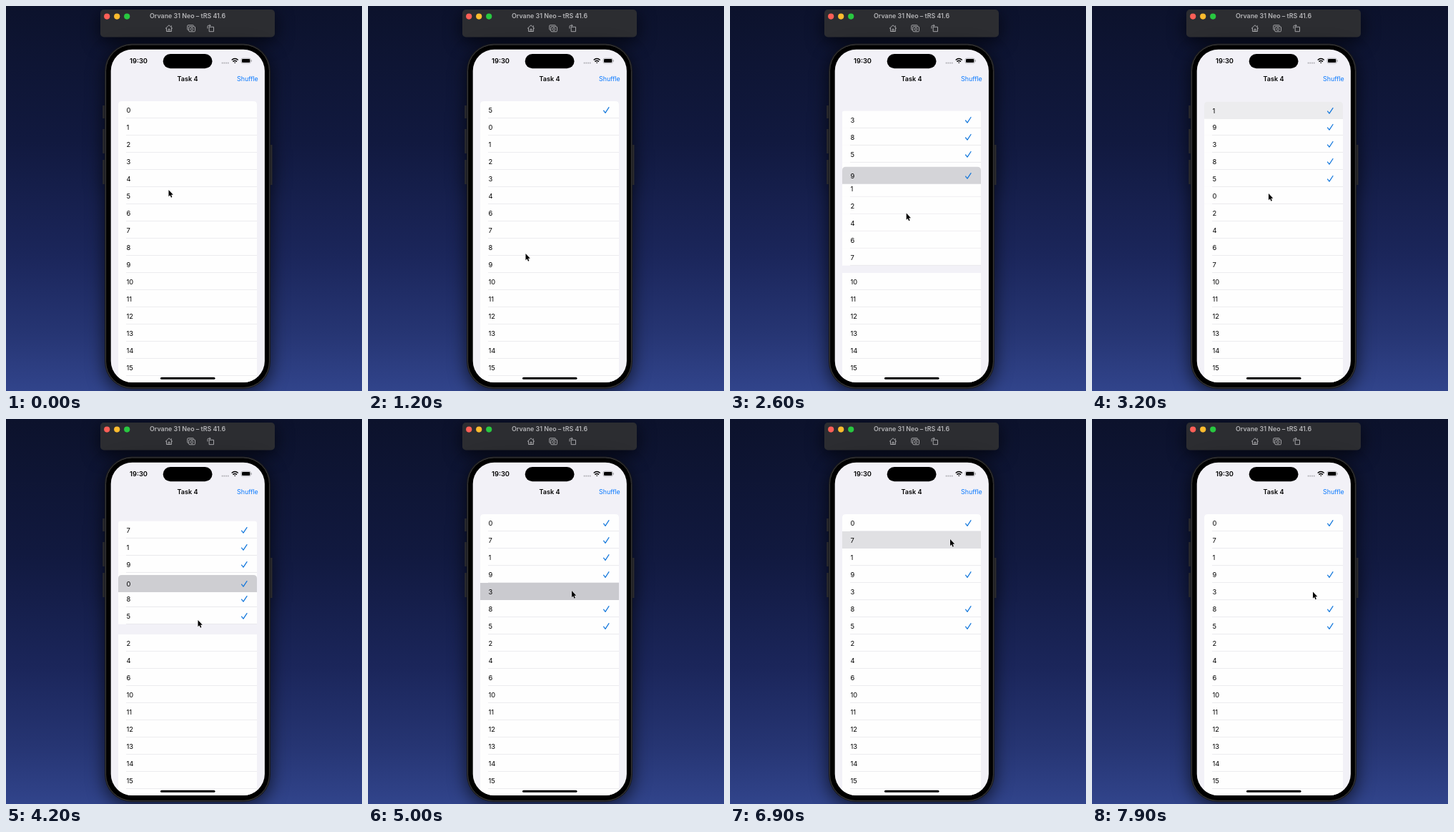
These frames come from a looping animation (498x538 px, 8000 ms). An HTML page:

```html
<!DOCTYPE html>
<html lang="en">
<head>
<meta charset="utf-8">
<title>Shuffle list</title>
<style>
  html, body { margin: 0; width: 100%; height: 100%; overflow: hidden; background: #0d1330; }
  svg { display: block; }
  text { font-family: Inter, sans-serif; font-size: 9.35px; }
  .semi { font-weight: 600; text-anchor: middle; }
  .icons { fill: none; stroke: #b4b4b7; stroke-width: .9; stroke-linejoin: round; }
  .check { fill: none; stroke: #1478dc; stroke-width: 1.25; stroke-linecap: round; stroke-linejoin: round; }
  .shadow { filter: drop-shadow(0 6px 12px #000a); }
</style>
</head>
<body>
<svg width="498" height="538" viewBox="0 0 498 538">
  <defs>
    <linearGradient id="sky" x2="0" y2="1">
      <stop offset="0" stop-color="#0c122c"/>
      <stop offset=".35" stop-color="#11193f"/>
      <stop offset=".65" stop-color="#1b265b"/>
      <stop offset=".85" stop-color="#263573"/>
      <stop offset="1" stop-color="#31448b"/>
    </linearGradient>
    <clipPath id="screen"><rect x="146.7" y="60.8" width="215.2" height="465.2" rx="30"/></clipPath>
  </defs>
  <rect width="498" height="538" fill="url(#sky)"/>

  <g class="shadow"><rect x="132" y="5" width="244" height="38.5" rx="5" fill="#2c2d31"/></g>
  <g id="lights"></g>
  <text class="semi" x="254" y="17.3" fill="#b4b4b7" style="font-size:8.9px">Orvane 31 Neo – tRS 41.6</text>
  <g class="icons">
    <path d="M223 31.5L228 26.8 233 31.5M224.5 30.5V35.5H231.5V30.5M227 35.5V32.3H229.2V35.5M231.3 29.5V27.3"/>
    <path d="M255.5 33.5H254.8Q253.8 33.5 253.8 32.5V27.8Q253.8 26.8 254.8 26.8H261.5Q262.5 26.8 262.5 27.6"/>
    <rect x="255.8" y="28.8" width="8.7" height="7" rx="1.2"/>
    <circle cx="260.1" cy="32.3" r="1.8"/>
    <path d="M284.2 29.3H290.5V35.7H284.2ZM282 31.5V28.6Q282 27.3 283.3 27.3H286M284.6 25.8L286.1 27.3 284.6 28.8"/>
  </g>

  <g class="shadow">
    <path d="M136.5 139V157M136.5 172V206M136.5 215V249M371.2 194V250" stroke="#29292c" stroke-width="2.6"/>
    <rect x="138" y="52.5" width="232" height="482.5" rx="38" fill="#1b1b1d"/>
  </g>
  <rect x="139.6" y="54.1" width="228.8" height="479.3" rx="36.5" fill="#000" stroke="#3c3c3e"/>

  <g clip-path="url(#screen)">
    <rect x="146" y="60" width="217" height="467" fill="#f2f1f7"/>
    <g id="list"></g>
    <rect x="216" y="518.7" width="76.5" height="3" rx="1.5"/>
  </g>

  <rect x="219.7" y="67" width="68.8" height="20.3" rx="10.1"/>
  <text class="semi" x="185.5" y="80.3">19:30</text>
  <path d="M301.8 79.6H311.5" stroke="#a9a9ae" stroke-width="1.6" stroke-dasharray="1.6 1.1"/>
  <path d="M315.7 75.6Q320.2 71.6 324.7 75.6M317.4 77.6Q320.2 75.2 323 77.6" fill="none" stroke="#000" stroke-width="1.4"/>
  <path d="M318.9 78.7L320.2 80.2 321.5 78.7Z"/>
  <rect x="329" y="73.1" width="13.3" height="7" rx="2.2" fill="none" stroke="#9b9ba0" stroke-width=".7"/>
  <rect x="330" y="74.1" width="11.3" height="5" rx="1.3"/>
  <path d="M343.4 75.5V77.7" stroke="#9b9ba0" stroke-width=".9"/>
  <text class="semi" x="254" y="105.4" style="font-size:9.1px">Task 4</text>
  <text x="323" y="105.4" fill="#0a7aff" style="font-size:8.9px">Shuffle</text>

  <path id="cursor" d="M0 0V9.2L2 7.3 3.5 10.7 4.9 10.1 3.5 6.7H6.3Z" stroke="#fff" stroke-width=".7" paint-order="stroke"/>
</svg>
<script>
const LOOP = 8000, STEP = 100;
const ROWS = 17, ROW_H = 24, TOP = 133;
const MOVE = 400, GLOW_HOLD = 150, GLOW_FADE = 350;
const TRAVEL = 200, REST = 150;   // the pointer travels, rests, then taps

// Where the pointer stops, and the number it taps there, if any
const stop = (time, x, y, tap) => ({ time, x, y, tap });
const stops = [
  stop(0, 228, 252), stop(250, 227, 262, 5), stop(1350, 220.5, 346, 8), stop(1920, 249, 276, 3),
  stop(2380, 246, 360, 9), stop(2820, 247, 262, 1), stop(3550, 258, 360, 7), stop(4024, 268.5, 281, 0),
  stop(4850, 285, 240, 3), stop(5520, 307, 202, 1), stop(6600, 308, 168, 7),
  stop(7300, 290, 344), stop(7750, 300, 290), stop(8050, 309, 241.5),
];

const $ = id => document.getElementById(id);
const clamp = v => Math.max(0, Math.min(1, v));
const ease = v => (v = clamp(v), v * v * (3 - 2 * v));
const mix = (a, b, k) => a + (b - a) * k;

function add(parent, tag, attrs = {}) {
  const el = document.createElementNS('http://www.w3.org/2000/svg', tag);
  for (const key in attrs) el.setAttribute(key, attrs[key]);
  return parent.appendChild(el);
}

['#fe5f57', '#febc2e', '#28c840'].forEach((fill, i) =>
  add($('lights'), 'circle', { cx: 141.2 + 14 * i, cy: 14.6, r: 4.1, fill }));

const rows = Array.from({ length: ROWS }, (_, n) => {
  const group = add($('list'), 'g');
  const cell = add(group, 'path');
  const line = add(group, 'path', { d: 'M168 23.6H351', stroke: '#dedee2', 'stroke-width': .6 });
  add(group, 'text', { x: 168.4, y: 16 }).textContent = n;
  const check = add(group, 'path', { class: 'check', d: 'M329.6 13.2L332 16.3 337 8.7' });
  return { group, cell, line, check };
});

function cellShape(r) {
  return `M157 24V${r}Q157 0 ${157 + r} 0H${351 - r}Q351 0 351 ${r}V24Z`;
}

// A first tap checks a number and lifts its row to the top; a second one unchecks it in place
function listState(t) {
  const order = rows.map((_, n) => n), checked = new Set();
  let active, glow = 0, lift = 0, from = 0;
  for (const { time, tap } of stops) {
    if (tap === undefined || t < time) continue;
    if (lift) order.unshift(...order.splice(from, 1));
    active = tap;
    from = order.indexOf(tap);
    glow = 1 - clamp((t - time - GLOW_HOLD) / GLOW_FADE);
    lift = checked.has(tap) ? 0 : ease((t - time) / MOVE);
    if (!checked.delete(tap)) checked.add(tap);
  }
  return { order, checked, active, glow, lift, from };
}

function drawList(t) {
  const { order, checked, active, glow, lift, from } = listState(t);
  order.forEach((n, i) => {
    const { group, cell, line, check } = rows[n];
    const isActive = n === active;
    const slot = !lift || i > from ? i : isActive ? i * (1 - lift) : i + lift;
    const radius = isActive && lift ? 5 : i ? 0 : 5 * (1 - lift);
    const k = isActive ? glow : 0;
    const gray = mix(254, 202, k);
    group.setAttribute('transform', `translate(0 ${TOP + slot * ROW_H})`);
    cell.setAttribute('d', cellShape(radius));
    cell.setAttribute('fill', `rgb(${gray},${gray},${mix(254, 207, k)})`);
    line.style.opacity = 1 - k;
    check.style.display = checked.has(n) ? '' : 'none';
  });
  if (active !== undefined) $('list').append(rows[active].group);
}

function drawCursor(t) {
  const next = stops.findIndex(s => s.time > t);
  const a = stops[next - 1], b = stops[next];
  const k = ease((t - (b.time - REST - TRAVEL)) / TRAVEL);
  $('cursor').setAttribute('transform', `translate(${mix(a.x, b.x, k)} ${mix(a.y, b.y, k)})`);
}

function render(now) {
  const t = Math.floor(now % LOOP / STEP) * STEP;
  drawList(t);
  drawCursor(t);
  requestAnimationFrame(render);
}
render(0);
</script>
</body>
</html>
```
